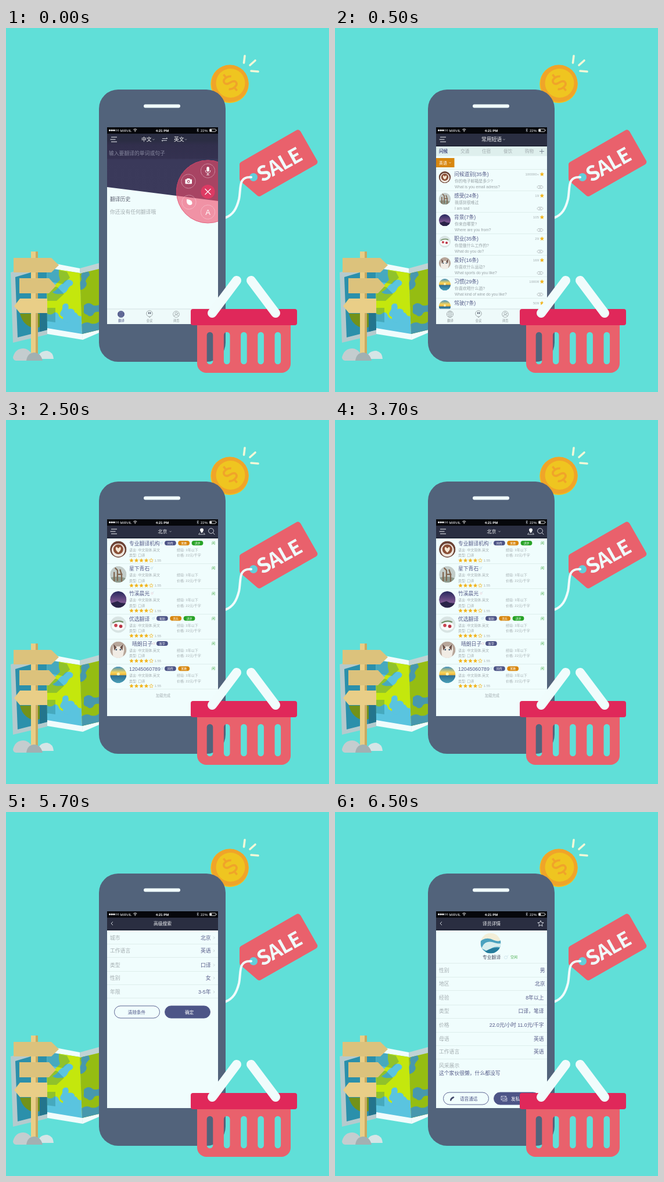
An HTML page that plays this animation: 556 by 627 pixels, repeating every 8000 ms.

```html
<!DOCTYPE html>
<html lang="zh-CN">
<head>
<meta charset="utf-8">
<title>Translation app tour</title>
<style>
html, body { margin: 0; width: 100%; height: 100%; overflow: hidden; background: #60dfd8; }
svg { display: block; }
#stage { width: 556px; height: 627px; }
text { font-family: "Liberation Sans", "Noto Sans CJK SC", "Noto Sans CJK", sans-serif; white-space: pre; }
.sale { font: 700 35px "Noto Sans CJK SC", "Noto Sans CJK", "Lato", sans-serif; letter-spacing: -1px; }
/* Each opaque screen covers the previous one from its start until the loop ends. */
.screen { animation: 8s step-end infinite; }
#phrases { animation-name: at500; }
#people { animation-name: at2500; }
#search { animation-name: at4500; }
#detail { animation-name: at6500; }
@keyframes at500 { 0% { visibility: hidden; } 6.25%, 100% { visibility: visible; } }
@keyframes at2500 { 0% { visibility: hidden; } 31.25%, 100% { visibility: visible; } }
@keyframes at4500 { 0% { visibility: hidden; } 56.25%, 100% { visibility: visible; } }
@keyframes at6500 { 0% { visibility: hidden; } 81.25%, 100% { visibility: visible; } }
</style>
</head>
<body>
<svg id="stage" viewBox="0 0 556 627">
  <defs>
    <clipPath id="glass"><path d="M174 171h191v339h-191z"/></clipPath>
    <clipPath id="list"><path d="M174 204h191v280h-191z"/></clipPath>
    <clipPath id="round"><circle r="10"/></clipPath>
    <clipPath id="upper"><path d="M174 171h191v127l-191-24z"/></clipPath>
    <clipPath id="mapMid"><path d="M70 413l57 9 4 105-60-10z"/></clipPath>
    <clipPath id="mapEnd"><path d="M127 423l33-8v105l-29 7z"/></clipPath>
    <clipPath id="mapLeft"><path d="M16 429l54-16 1 107-51 13z"/></clipPath>
    <linearGradient id="night" x1="0" y1="0" x2="0" y2="1">
      <stop offset="0" stop-color="#2a2e41"/><stop offset=".18" stop-color="#2b2d43"/>
      <stop offset=".24" stop-color="#312f4c"/><stop offset=".42" stop-color="#343150"/>
      <stop offset=".44" stop-color="#3a395a"/><stop offset="1" stop-color="#3b3a5b"/>
    </linearGradient>
    <linearGradient id="dusk" x1="0" y1="0" x2="0" y2="1">
      <stop offset="0" stop-color="#26285c"/><stop offset=".65" stop-color="#7a568f"/><stop offset="1" stop-color="#241f45"/>
    </linearGradient>
    <linearGradient id="sunset" x1="0" y1="0" x2="0" y2="1">
      <stop offset="0" stop-color="#3c8fc4"/><stop offset=".35" stop-color="#f5d35b"/>
      <stop offset=".5" stop-color="#f0b73e"/><stop offset=".55" stop-color="#2f6f93"/><stop offset="1" stop-color="#4aa0b8"/>
    </linearGradient>
  </defs>

  <rect width="556" height="627" fill="#60dfd8"/>

  <g id="map">
    <path d="M8 421l62-17 1 124-59 14z" fill="#b4cacd"/>
    <path d="M70 403l57 11 5 123-61-10z" fill="#f0fcfc"/>
    <path d="M127 414l33-9v120l-28 12z" fill="#c0d3d4"/>
    <path d="M131 527l29-7v5l-28 12z" fill="#f0fcfc"/>
    <g clip-path="url(#mapLeft)">
      <path d="M8 400h70v150H8z" fill="#2b90ab"/>
      <path d="M24 492h47v14q-8 10-22 11-20-4-25-25z" fill="#72921a"/>
      <path d="M58 491h13v38h-13z" fill="#23758d"/>
    </g>
    <g clip-path="url(#mapMid)">
      <path d="M60 400h80v140H60z" fill="#5ac4df"/>
      <path d="M91 410h44v78q-4 12-11 7-4-8-9-3-4 12-14 10-9-1-11-9-4-6-9-1-7 4-12-2v-40l12-4 12-12-2-8z" fill="#c4e70d"/>
      <path d="M98 440q5-8 13-6 7 3 3 9-6 2-8 8-4 8-14 7-7 1-12-3 8-4 10-8 3-5 8-7zM97 479q2-6 9-4 3 5 1 9 9-2 11 4 1 8-6 10 1 9-7 10-8-1-7-10-7-3-4-9 4-5 3-10z" fill="#5ac4df"/>
      <path d="M70 413l17 3 18 4 5 10-12 11-28-5zM70 446h18l12 12-13 12H70zM70 482h15v25l-15-2z" fill="#176b72" opacity=".3"/>
    </g>
    <g clip-path="url(#mapEnd)">
      <path d="M120 400h45v140h-45z" fill="#95bd12"/>
      <path d="M136 417q8 1 8 9-5 4-7 10 4 6-1 11-6 6-10 3v-10q6-6 3-12 1-9 7-11zM134 478q7-7 14-2 3 4 12 1v12q-8-1-10 5-6 5-10 0-8-2-6-8zM128 512q10-8 18-3 8 2 14-3v30h-32z" fill="#4798ad"/>
    </g>
  </g>

  <g id="sign">
    <path d="M12 567q4-15 18-15 14 1 18 21H17q-5-1-5-6z" fill="#c4cdcf"/>
    <path d="M55 570q1-14 16-14 10 2 11 14z" fill="#d5e5e6"/>
    <path d="M43 385h12v185H43z" fill="#e9ce87"/>
    <path d="M51 385h4v185h-4z" fill="#c9aa62"/>
    <path d="M35 573q2-14 14-14 11 1 14 14z" fill="#a2b0b2"/>
    <path d="M13 396h65l13 12.500-13 12.500H13zM23 431h51l12 13-12 13H23z" fill="#dcc27c"/>
    <path d="M14 479l10-13h47v25H24z" fill="#e9ce87"/>
  </g>

  <g id="coin">
    <circle cx="385" cy="96.500" r="32.800" fill="#efc120"/>
    <circle cx="385.500" cy="95.500" r="32" fill="#f0a429"/>
    <circle cx="386.500" cy="95" r="25" fill="#efc520"/>
    <g transform="translate(386 94) rotate(-40)" fill="none" stroke="#f0a429" stroke-width="3.600">
      <path d="M8-7Q5-11-1-11-8-11-8-6-8-1 0 0 8 1 8 6 8 11 0 11-6 11-9 7M0-18v7M0 11v7"/>
    </g>
    <path d="M411 48l-1.500 12M420 64l9-8M422 74l12 1" stroke="#f2f8d8" stroke-width="3.600" stroke-linecap="round"/>
  </g>

  <g id="tag">
    <path d="M406 230l94-54q4-2 7 2l29 51q1 4-2 6l-95 54q-3 2-6 0l-29-25q-2-1-2-4v-25q0-3 4-5z" fill="#e9616c"/>
    <circle cx="426" cy="257" r="7" fill="#62cfda"/>
    <path d="M422 257c-23-2-17 20-21 38-4 16-10 27-24 32" fill="none" stroke="#f0fcfc" stroke-width="4" stroke-linecap="round"/>
    <text class="sale" x="0" y="13" transform="translate(470 235) rotate(-29)" text-anchor="middle" fill="#f0fcfc">SALE</text>
  </g>

  <rect x="160" y="106" width="218" height="469" rx="33" fill="#52637b"/>
  <rect x="237" y="131.500" width="63" height="6" rx="3" fill="#f0fcfc"/>

  <g id="glassBox" clip-path="url(#glass)"></g>

  <g id="basket">
    <path id="body" fill="#e9616c" fill-rule="evenodd"/>
    <rect x="318" y="484" width="183" height="28" rx="4" fill="#e0285a"/>
    <path d="M397 435l-42 56M422 435l42 56" stroke="#f0fcfc" stroke-width="16" stroke-linecap="round"/>
  </g>
</svg>

<script>
const paper = '#f0fdfd', navy = '#4d5587', ink = '#555b88', grey = '#a3adb0', bar = '#2a2e41', black = '#06070b', line = '#deeeec', gold = '#f2b41c';

const text = (x, y, size, fill, str, anchor = 'start', extra = '') =>
  `<text x="${x}" y="${y}" font-size="${size}" fill="${fill}" text-anchor="${anchor}" ${extra}>${str}</text>`;
const box = (x, y, w, h, fill, rx = 0, extra = '') =>
  `<rect x="${x}" y="${y}" width="${w}" height="${h}" rx="${rx}" fill="${fill}" ${extra}/>`;
const dot = (x, y, r, fill, extra = '') => `<circle cx="${x}" cy="${y}" r="${r}" fill="${fill}" ${extra}/>`;
const stroke = (d, color, w = 1) => `<path d="${d}" fill="none" stroke="${color}" stroke-width="${w}"/>`;
const rule = y => box(174, y, 191, 1, line);
const caret = (x, y, color = '#cdd3da') => stroke(`M${x - 1.5} ${y - .7}l1.500 1.500 1.500-1.500`, color, .7);
const arrow = (x, y) => stroke(`M${x - 1} ${y - 2}l2 2-2 2`, '#b4c0c4', .7);

function star(x, y, r, fill, extra = '') {
  let pts = '';
  for (let i = 0; i < 10; i++) {
    const a = i * Math.PI / 5, q = i % 2 ? r * .45 : r;
    pts += `${(x + q * Math.sin(a)).toFixed(2)},${(y - q * Math.cos(a)).toFixed(2)} `;
  }
  return `<polygon points="${pts}" fill="${fill}" ${extra}/>`;
}

const photos = [
  dot(0, 0, 10, '#6b4335') + dot(0, 1, 8, '#eee7df') + dot(0, 0, 6, '#8a4f36') +
    '<path d="M0 4Q-4 1-3-2-2-4 0-1 2-4 3-2 4 1 0 4z" fill="#f4e6d2"/>',
  dot(0, 0, 10, '#c3cdca') + '<path d="M-10 4Q0 1 10 5V10H-10z" fill="#8e9c8f"/>' +
    stroke('M-5 9V-3M-1 8V-5l-3-3M4 9V0L2-6M-1 0H5', '#806650', 1.6),
  dot(0, 0, 10, 'url(#dusk)') + '<path d="M-10 5L-1 2 3 4 10 5V10H-10z" fill="#292348"/>',
  dot(0, 0, 10, '#d8e4e3') + '<ellipse cy="2" rx="8" ry="5" fill="#f8fbfa"/>' + dot(-3, 1, 2, '#c94350') +
    dot(3, 2, 2, '#b83345') + stroke('M-7-2Q0-6 6-3', '#719066', 1.5),
  dot(0, 0, 10, '#b7a69a') + '<path d="M-6-7l3 3h5l4-3 1 8-2 10H-6L-7 2z" fill="#f1ece5"/>' +
    '<path d="M-6-7l4 4-3 4zM6-7L2-3 5 1z" fill="#6b5148"/>' + dot(-2.5, 0, 1, '#405a70') + dot(2.5, 0, 1, '#405a70'),
  dot(0, 0, 10, 'url(#sunset)') + dot(0, -1, 1.8, '#fff3ae'),
  dot(0, 0, 10, '#f2eed8') + '<path d="M-10-2Q-4-7 3-3 8-1 10-3V10H-10z" fill="#4ba2bf"/>' +
    '<path d="M-9 5Q-6-3 2-1 8 1 10 0V4Q2 2-3 8z" fill="#d8eeee"/><path d="M-8 10Q0 3 10 5V10z" fill="#257c9c"/>'
];
const photo = (i, x, y, r) =>
  `<g transform="translate(${x} ${y}) scale(${r / 10})"><g clip-path="url(#round)">${photos[i]}</g></g>`;

function status() {
  let s = box(174, 171, 191, 11, black);
  for (let i = 0; i < 5; i++) s += dot(178.7 + i * 3.6, 176.3, 1.3, i < 3 ? '#fff' : 'none', 'stroke="#fff" stroke-width=".5"');
  s += text(196.5, 178.5, 6, '#fff', 'MIRVIL') + text(269, 178.5, 6, '#fff', '4:21 PM', 'middle', 'font-weight="700"');
  s += stroke('M219.300 175q3-2.500 6 0M220.500 176.600q1.800-1.500 3.600 0', '#fff', .9) + dot(222.3, 178, .8, '#fff');
  s += stroke('M328.500 174.500l3 3-1.500 1.500v-6l1.500 1.500-3 3', '#cfd3dc', .6) + text(335, 178.5, 6, '#fff', '22%');
  return s + box(350.5, 174, 10.5, 4.6, 'none', .8, 'stroke="#fff" stroke-width=".7"') + box(351, 174.5, 3, 3.6, '#fff') + box(361.8, 175.4, .8, 1.8, '#fff');
}
const menu = stroke('M181 188h10M179.500 192h9M181 196h10', '#f0f2f5', 1.1);
const back = stroke('M184 189l-3 3 3 3', '#dde1e8', .9);
const frame = () => box(174, 171, 191, 339, paper) + box(174, 171, 191, 33, bar) +
  box(174, 202.5, 191, 1.5, '#1c2030') + status();
const title = (str, size = 7.8, x = 269.5) => text(x, 195, size, '#f4f6f8', str, 'middle');

function tabs(active) {
  const c = '#8d9699';
  let s = box(174, 484, 191, 26, '#eefafa') + box(174, 483.5, 191, 1, '#d4e2e3');
  s += dot(198, 493, 5.6, active ? navy : 'none', `stroke="${active ? navy : c}" stroke-width=".7"`);
  s += stroke('M192.500 493h11M198 487.500v11M194 489.500q4 2 8 0M194 496.500q4-2 8 0', active ? '#8990b4' : c, .5) +
    `<ellipse cx="198" cy="493" rx="2.800" ry="5.500" fill="none" stroke="${active ? '#8990b4' : c}" stroke-width=".5"/>`;
  s += dot(247, 492, 5.2, 'none', `stroke="${c}" stroke-width=".8"`) + stroke('M246 497l1 2 2-2', c, .7) +
    box(245, 489.5, 1.5, 3, '#444b5c') + box(247.8, 489.5, 1.5, 3, '#444b5c');
  s += dot(293, 493, 5.4, 'none', `stroke="${c}" stroke-width=".7"`) + dot(293, 491.5, 2, 'none', `stroke="${c}" stroke-width=".7"`) +
    stroke('M289 497q1-3 4-3 3 0 4 3M295 493l2-2', c, .7);
  ['翻译', '会议', '译员'].forEach((t, i) => s += text([198.5, 247, 293][i], 506, 5.3, i || !active ? c : navy, t, 'middle'));
  return s;
}

function home() {
  const ring = (x, y) => dot(x, y, 12, 'none', 'stroke="#fbe6ec" stroke-width=".7" stroke-dasharray="1.500 1"');
  let s = box(174, 171, 191, 339, paper) + '<path d="M174 171h191v127l-191-24z" fill="url(#night)"/>' + status() + menu;
  s += text(233, 195.3, 8.8, '#fff', '中文') + caret(254, 192) + text(289, 195.3, 8.8, '#fff', '英文') + caret(309.5, 192);
  s += stroke('M269 190.500h9l-2-1.700M277 193.700h-9l2 1.700', '#e3e5ec', .9);
  s += text(177, 219.3, 8.8, '#85869d', '输入要翻译的单词或句子');
  s += text(179, 298, 8.8, '#5c6070', '翻译历史') + text(179, 320, 8.8, grey, '你还没有任何翻译哦');
  s += dot(347.5, 282, 54, '#f092a5', 'stroke="#e4627f"') + `<g clip-path="url(#upper)">${dot(347.5, 282, 54, '#a84463', 'stroke="#c23f64"')}</g>`;
  s += ring(347.5, 246) + ring(314, 264) + ring(315, 300) + ring(347.5, 317) + dot(347.5, 282, 12, '#dd3a63');
  s += stroke('M342.500 277l10 10M352.500 277l-10 10', '#fff', 1.1);
  s += box(345.3, 239, 4.6, 8.5, '#fff', 2.3) + stroke('M343.300 245q0 5 4.200 5 4.300 0 4.300-5M347.500 250v3M345 253h5', '#fff', .9);
  s += box(308.5, 260.5, 11.5, 8, '#fff', 1) + box(311.5, 259, 5, 2, '#fff') + dot(314.2, 264.5, 2.4, '#a84463') + dot(314.2, 264.5, 1.2, '#fff');
  s += '<path d="M311 295q6 0 9 4 2 6-4 6-6-1-5-10z" fill="#fff"/>';
  return s + text(347.5, 321.5, 13, '#fff', 'A', 'middle') + tabs(true);
}

function phrases() {
  const rows = [
    ['问候道别(35条)', '你的电子邮箱是多少?', 'What is you email adress?', '100000+'],
    ['感受(24条)', '我感到很难过', 'I am sad', '19'],
    ['背景(7条)', '你来自哪里?', 'Where are you from?', '105'],
    ['职业(35条)', '你是做什么工作的?', 'What do you do?', '29'],
    ['爱好(16条)', '你喜欢什么运动?', 'What sports do you like?', '169'],
    ['习惯(29条)', '你喜欢喝什么酒?', 'What kind of wine do you like?', '10008'],
    ['驾驶(7条)', '', '', '509']
  ];
  let s = frame() + menu + title('常用短语', 8.8) + caret(291, 192) + box(174, 204, 191, 16.5, '#deefed');
  ['问候', '交通', '住宿', '餐饮', '购物'].forEach((t, i) => s += text(179 + 37 * i, 215, 7.6, i ? grey : navy, t, 'start', i ? '' : 'font-weight="700"'));
  s += stroke('M352 212.500h8M356 208.500v8', '#667080', .8);
  s += box(174, 224, 31.5, 16, '#d8870f') + text(179, 234.5, 7, '#fff', '英语') + caret(198, 232, '#fff');
  s += '<g clip-path="url(#list)">';
  rows.forEach(([head, cn, en, n], i) => {
    const y = 37 * i;
    s += rule(243 + y) + photo(i === 6 ? 5 : i, 189, 257 + y, 10.3) + text(205, 255 + y, 8.8, ink, head);
    s += text(206, 266.3 + y, 6.9, '#98a2a6', cn) + text(206, 276 + y, 6.65, '#98a2a6', en);
    s += text(351, 254.3 + y, 6, grey, n, 'end') + star(356.3, 252 + y, 4, gold);
    s += `<ellipse cx="353" cy="${274 + y}" rx="5" ry="2.600" fill="none" stroke="#a9b2b4" stroke-width=".7"/>` +
      stroke(`M350.500 ${271.5 + y}l5 5M355.500 ${271.5 + y}l-5 5`, '#a9b2b4', .7);
  });
  return s + '</g>' + tabs(false);
}

function people() {
  const tint = [navy, '#d8870f', '#27a327'];
  const rows = [
    ['专业翻译机构', 273, ['同传', '家教', '讲评'], 268],
    ['星下青石', 0, [], 251],
    ['竹溪晨光', 0, [], 252],
    ['优选翻译', 259, ['笔助', '音乐', '讲评'], 254],
    ['晴朗日子', 259, ['医学'], 255],
    ['12045060789', 273, ['同传', '家教'], 269]
  ];
  let s = frame() + menu + title('北京', 8) + caret(283, 192);
  s += '<path d="M337 195q-3-4-3-5.500a3 3 0 0 1 6 0q0 1.500-3 5.500z" fill="#fff"/>' + stroke('M334 194l-2.500 3h11l-2.500-3', '#dfe3ea', .8);
  s += dot(353, 191, 4.4, 'none', 'stroke="#dfe3ea" stroke-width=".9"') + stroke('M356.300 194.300l3 3', '#dfe3ea', 1);
  rows.forEach(([name, x, tags, g], i) => {
    const y = 43.25 * i;
    s += photo(i, 193.3, 222.7 + y, 14.2) + text(i === 4 ? 217 : 212, 215.8 + y, 8.8, ink, name);
    s += dot(g - .5, 212 + y, 1.6, 'none', `stroke="${i === 2 || i === 4 ? '#ebc3cd' : '#b4d5e6'}" stroke-width=".7"`) + stroke(`M${g + .6} ${211 + y}l2-2`, '#b4d5e6', .7);
    tags.forEach((t, k) => s += box(x + 23.3 * k, 208 + y, 19.8, 8, tint[k], 4) + text(x + 9.9 + 23.3 * k, 213.9 + y, 4.8, '#fff', t, 'middle'));
    s += text(354, 214 + y, 6, '#49ad4b', '闲');
    s += text(212, 225.8 + y, 6, grey, '语言: 中文简体,英文') + text(212, 235.3 + y, 6, grey, '类型: 口译');
    s += text(294, 225.8 + y, 6, grey, '经验: 3年以下') + text(294, 235.3 + y, 6, grey, '价格: 22元/千字');
    for (let k = 0; k < 5; k++) s += star(216 + 8.5 * k, 242 + y, k < 4 ? 4 : 3.5, k < 4 ? gold : 'none', k < 4 ? '' : `stroke="${gold}" stroke-width=".7"`);
    s += text(255.5, 244.2 + y, 6, grey, '1.55') + rule(247 + Math.round(y));
  });
  return s + text(270.5, 477, 6.3, grey, '加载完成', 'middle');
}

const button = (x, y, full) => box(x + .5, y + .5, 78, 21, full ? navy : paper, 10.5, `stroke="${navy}" stroke-width=".9"`);

function search() {
  const base = [220, 242.3, 267, 289.3, 313.3], rules = [227, 250, 274, 297, 320];
  const rows = [['城市', '北京'], ['工作语言', '英语'], ['类型', '口译'], ['性别', '女'], ['年限', '3-5年']];
  let s = frame() + back + title('高级搜索');
  rows.forEach(([k, v], i) => s += text(179, base[i], 8.8, grey, k) + text(352.5, base[i], 8.8, ink, v, 'end') + arrow(358, base[i] - 3.3) + rule(rules[i]));
  return s + button(186, 333.5) + text(225, 347.8, 7.6, navy, '清除条件', 'middle') +
    button(273, 333.5, true) + text(315.5, 347.8, 7.6, '#fff', '确定', 'middle');
}

function detail() {
  const base = [276, 299, 323, 346, 370, 393.5, 416], rules = [260, 284, 307, 332, 355, 379, 402, 425];
  const rows = [['性别', '男', 361.5], ['地区', '北京', 361.5], ['经验', '8年以上', 359.5], ['类型', '口译，笔译', 359.5],
    ['价格', '22.0元/小时 11.0元/千字', 359.5], ['母语', '英语', 359.5], ['工作语言', '英语', 359.5]];
  let s = frame() + back + title('译员详情') + star(354, 192.3, 5.4, 'none', 'stroke="#dfe3ea" stroke-width=".9"');
  s += photo(6, 268, 226, 17.5) + text(254, 253, 7.8, '#4b5064', '专业翻译');
  s += dot(294, 250.5, 2.6, 'none', 'stroke="#c8e0e8" stroke-width=".8"') + stroke('M296 249l2.500-2.500', '#c8e0e8', .8) + text(302, 252.4, 6, '#49ad4b', '空闲');
  rules.forEach(y => s += rule(y));
  rows.forEach(([k, v, x], i) => s += text(179, base[i], 8.8, grey, k) + text(x, base[i], 8.8, ink, v, 'end'));
  s += text(179, 440, 8.8, grey, '风采展示') + text(179, 453.3, 8.8, ink, '这个家伙很懒，什么都没写');
  s += button(186, 482.5) + text(215, 496.8, 7.6, navy, '语音通话') + button(273, 482.5, true) + text(303, 496.8, 7.6, '#fff', '发私信');
  s += '<path d="M198 497q0-5 6-7l1.500 1.500-1.500 1.500q-3 1-3.500 3.500l-1 1.500z" fill="#3f4668"/>';
  return s + stroke('M286 489.500h8.500v6.500H286zM286 489.500l4.300 4 4.200-4M286 496l3-3M294.500 496l-3-3M288 498h8v-6', '#e4e7f2', .7);
}

document.getElementById('glassBox').innerHTML = Object.entries({ home, phrases, people, search, detail })
  .map(([id, draw]) => `<g id="${id}" class="screen">${draw()}</g>`).join('');

// Slots are real holes, so the phone shows through them.
document.getElementById('body').setAttribute('d', 'M329 511h161v67a16 16 0 0 1-16 16H345a16 16 0 0 1-16-16z' +
  [351, 380.2, 409.4, 438.6, 467.8].map(x => `M${x - 5.3} 529a5.300 5.300 0 0 1 10.600 0v45a5.300 5.300 0 0 1-10.600 0z`).join(''));
</script>
</body>
</html>
```
